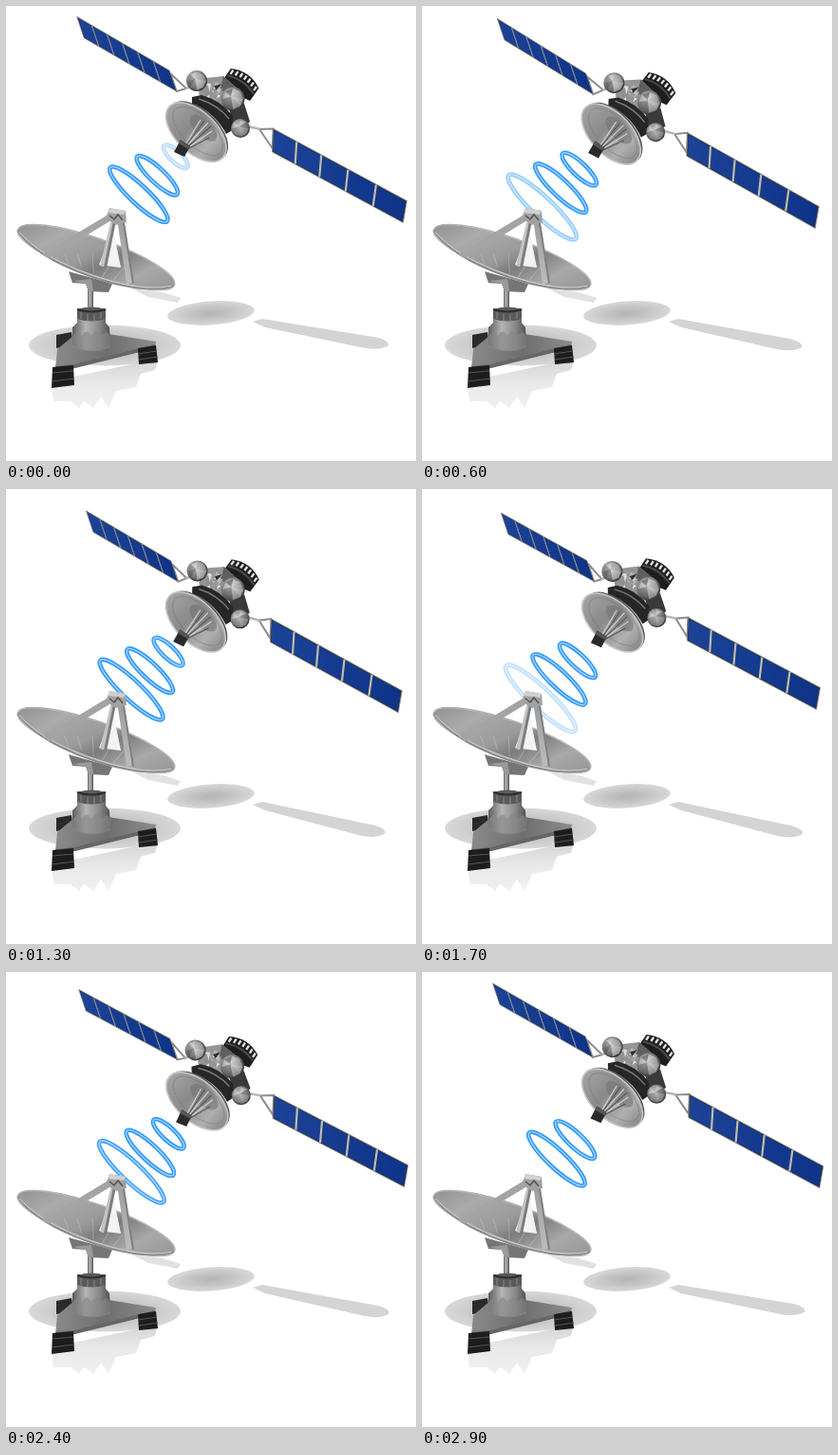
An HTML page that plays this animation: 432 by 480 pixels, repeating every 3000 ms.

```html
<!DOCTYPE html>
<html lang="en">
<head>
<meta charset="utf-8">
<title>Satellite link</title>
<style>
html, body { margin: 0; width: 100%; height: 100%; overflow: hidden; background: #fff; }
svg { display: block; width: 432px; height: 480px; }
</style>
</head>
<body>
<svg viewBox="0 0 432 480" xmlns="http://www.w3.org/2000/svg">
  <defs>
    <radialGradient id="ball" cx=".4" cy=".35" r=".7">
      <stop offset="0" stop-color="#d4d4d4"/><stop offset=".5" stop-color="#858585"/><stop offset="1" stop-color="#2c2c2c"/>
    </radialGradient>
    <linearGradient id="bowl" x1="0" x2="1" y1=".2" y2=".4">
      <stop offset="0" stop-color="#8e8e8e"/><stop offset=".25" stop-color="#ababab"/><stop offset=".5" stop-color="#9a9a9a"/>
      <stop offset=".62" stop-color="#7c7c7c"/><stop offset=".82" stop-color="#a8a8a8"/><stop offset="1" stop-color="#9a9a9a"/>
    </linearGradient>
    <linearGradient id="dish" x1="0" x2="1">
      <stop offset="0" stop-color="#a2a2a2"/><stop offset=".4" stop-color="#8a8a8a"/><stop offset=".75" stop-color="#b0b0b0"/><stop offset="1" stop-color="#8a8a8a"/>
    </linearGradient>
    <linearGradient id="metal">
      <stop offset="0" stop-color="#5e5e5e"/><stop offset=".35" stop-color="#b4b4b4"/><stop offset=".7" stop-color="#8a8a8a"/><stop offset="1" stop-color="#505050"/>
    </linearGradient>
    <linearGradient id="strut" x2="0" y2="1">
      <stop offset="0" stop-color="#9b9b9b"/><stop offset="1" stop-color="#bdbdbd"/>
    </linearGradient>
    <linearGradient id="plate">
      <stop offset="0" stop-color="#8a8a8a"/><stop offset=".5" stop-color="#6e6e6e"/><stop offset="1" stop-color="#8c8c8c"/>
    </linearGradient>
    <radialGradient id="shade">
      <stop offset="0" stop-color="#b4b4b4"/><stop offset=".6" stop-color="#c8c8c8"/><stop offset="1" stop-color="#d8d8d8"/>
    </radialGradient>
    <linearGradient id="mirror" x2="0" y2="1">
      <stop offset="0" stop-color="#d4d4d4"/><stop offset=".5" stop-color="#e9e9e9"/><stop offset="1" stop-color="#f0f0f0"/>
    </linearGradient>
    <linearGradient id="cells">
      <stop offset="0" stop-color="#1c4397"/><stop offset="1" stop-color="#0e3388"/>
    </linearGradient>
  </defs>

  <!-- ground shadows -->
  <path d="M48 396L160 372 157 384 142 388 137 402 116 406 108 424 100 412 92 424 82 417 77 424 68 417 50 417Z" fill="url(#mirror)"/>
  <ellipse cx="104" cy="358" rx="80" ry="21.5" fill="url(#shade)"/>
  <path d="M130 297L165 302 184 308 181 313 150 307Z" fill="#e2e2e2"/>
  <ellipse cx="216" cy="324" rx="46" ry="12.5" fill="url(#shade)" transform="rotate(-4 216 324)"/>
  <path id="wing" fill="#d4d4d4"/>

  <g id="rings" fill="none"></g>

  <!-- ground station -->
  <g>
    <path d="M53 347L69 344 71 358 53 361Z" fill="#2a2a2a"/>
    <path d="M54 362L72 347 108 346 158 354 157 361 73 381 52 382Z" fill="url(#plate)"/>
    <path d="M72 378L157 357 157 361 73 382 52 383 52 380Z" fill="#666"/>
    <path d="M49 381L71 379 72 400 48 403Z" fill="#1d1d1d"/>
    <path d="M49 387L71 385M48 396L72 393" stroke="#555"/>
    <path d="M139 361L158 358 160 376 140 378Z" fill="#1d1d1d"/>
    <path d="M139 367L159 364M140 373L160 370" stroke="#555"/>
    <path d="M86 298H92V322H86Z" fill="url(#metal)"/>
    <path d="M75 320Q90 315 105 320L105 334 109 339 110 358Q90 369 70 358L70 339 75 334Z" fill="url(#metal)"/>
    <path d="M75 320Q90 315 105 320V330Q90 335 75 330Z" fill="#5a5a5a"/>
    <path d="M75 320Q90 325 105 320" fill="none" stroke="#2e2e2e" stroke-width="2"/>
    <path d="M79 323V330M86 325V332M93 325V332M100 323V330" stroke="#888"/>
    <path d="M70 360V349Q75 340 80 348 85 339 90 348 96 339 101 348 106 340 110 349V360Q90 369 70 360Z" fill="#888" opacity=".65"/>
    <path d="M66 280L70 292 84 293 87 301 108 302 112 293Z" fill="#757575"/>
    <path d="M70 290L84 293 87 301 92 301 90 288Z" fill="#9a9a9a"/>
    <g transform="rotate(19.5 95 265)">
      <ellipse cx="95" cy="265" rx="87.5" ry="19.5" fill="url(#bowl)" stroke="#b4b4b4" stroke-width="1.6"/>
      <path d="M8 266Q35 286 95 286 155 286 182 266" fill="none" stroke="#8b8b8b" stroke-width="2"/>
      <path d="M10 267Q38 284 95 284 152 284 180 267" fill="none" stroke="#cfcfcf"/>
      <path d="M75 268L84 280M90 262L98 282M112 265L108 283M62 272L70 281M126 266L120 282" stroke="#c4c4c4" opacity=".5"/>
    </g>
    <path d="M113 236L121 276 98 273Z" fill="#f3f3f3"/>
    <path d="M106 221L111 226 45 266 38 262Z" fill="#a4a4a4"/>
    <path d="M111 225L116 226 106 276 99 274Z" fill="#c4c4c4"/>
    <path d="M113 227L116 226 106 276 103 276Z" fill="#7c7c7c"/>
    <path d="M117 224L124 223 135 292 127 293Z" fill="url(#strut)"/>
    <path d="M122 223L124 223 135 292 133 293Z" fill="#808080"/>
    <path d="M109 213L126 216 127 228 116 231 105 224Z" fill="#a2a2a2"/>
    <path d="M109 213L126 216 124 220 107 218Z" fill="#d0d0d0"/>
    <path d="M109 221L114 225 118 220 123 226" fill="none" stroke="#555" stroke-width="1.5"/>
  </g>

  <!-- satellite -->
  <g id="panels"></g>
  <g id="body">
    <path d="M189 87L198 84M250 126L268 130" stroke="#b5b5b5" stroke-width="2.5"/>
    <g transform="translate(247 83) rotate(35)">
      <path d="M-18 -8Q0 -18 18 -8V8Q0 13 -18 8Z" fill="#1e1e1e"/>
      <path d="M-17 0Q0 -7 17 0" fill="none" stroke="#4a4a4a" stroke-width="2"/>
      <path id="slots" stroke="#e2e2e2" stroke-width="2.4"/>
    </g>
    <path d="M234 106L251 103 257 122 243 134Z" fill="#3a3a3a"/>
    <path d="M203 91L210 76 229 74 245 88 240 109 222 114 205 102Z" fill="#949494"/>
    <path d="M229 74L245 88 241 98 226 88Z" fill="#5f5f5f"/>
    <g id="foil"></g>
    <path d="M196 96L206 94Q226 99 239 116L240 130 232 135Q220 112 196 103Z" fill="#262626"/>
    <path d="M203 98Q223 104 235 119" fill="none" stroke="#777" stroke-width="1.5"/>
    <g id="balls"></g>
    <g transform="rotate(44 201 133)">
      <ellipse cx="201" cy="131" rx="39" ry="21.5" fill="#5a5a5a"/>
      <ellipse cx="200.5" cy="133.5" rx="39" ry="21.5" fill="url(#dish)" stroke="#c6c6c6" stroke-width="1.6"/>
      <ellipse cx="201" cy="131.5" rx="33" ry="16" fill="none" stroke="#777" opacity=".5"/>
      <ellipse cx="203" cy="125" rx="18" ry="9" fill="#767676" opacity=".6"/>
    </g>
    <path d="M189 146L205 120M190 148L213 123M191 150L217 132" stroke="#d0d0d0" stroke-width="1.2"/>
    <path d="M190 147L209 121M191 149L216 127M191 151L214 139" stroke="#5a5a5a" stroke-width="1.2"/>
    <path d="M184 141L194 148 188 159 177 154Z" fill="#2a2a2a"/>
    <path d="M184 141L194 148 192 151 182 145Z" fill="#555"/>
  </g>
</svg>
<script>
const NS = 'http://www.w3.org/2000/svg';
const $ = id => document.getElementById(id);
const LOOP = 3000, STEP = 100;

function add(parent, tag, attrs) {
  const el = document.createElementNS(NS, tag);
  set(el, attrs);
  parent.appendChild(el);
  return el;
}
function set(el, attrs) {
  for (const k in attrs) el.setAttribute(k, attrs[k]);
}

let seed = 7;
const rnd = () => (seed = (seed * 16807) % 2147483647) / 2147483647;
const grey = (lo, hi) => {
  const v = Math.round(lo + rnd() * (hi - lo));
  return `rgb(${v},${v},${v})`;
};

function facetBall(x, y, r) {
  const g = $('balls');
  add(g, 'circle', { cx: x, cy: y, r, fill: 'url(#ball)' });
  for (let i = 0; i < 8; i++) {
    const a = i * Math.PI / 4, b = a + Math.PI / 4, q = r * .88;
    const cx = x - r * .15, cy = y - r * .2;
    add(g, 'path', {
      d: `M${cx} ${cy}L${x + q * Math.cos(a)} ${y + q * Math.sin(a)} ${x + q * Math.cos(b)} ${y + q * Math.sin(b)}Z`,
      fill: grey(60, 240), opacity: .5
    });
  }
}

// crumpled foil on the hull
for (let i = 0; i < 28; i++) {
  const x = 208 + rnd() * 22, y = 80 + rnd() * 20;
  const p = () => `${x + rnd() * 10 - 5} ${y + rnd() * 10 - 5}`;
  add($('foil'), 'path', { d: `M${p()}L${p()} ${p()}Z`, fill: rnd() < .2 ? '#2c2c2c' : grey(130, 250) });
}
facetBall(201, 79, 11);
facetBall(239, 98, 12.5);
facetBall(247, 129, 10);

let slots = '';
for (let x = -15; x <= 15; x += 5) slots += `M${x} ${-11.5 + x * x / 65}v5`;
$('slots').setAttribute('d', slots);

const bracket = add($('panels'), 'path', { fill: 'none', stroke: '#8d8d8d', 'stroke-width': 2 });
function makePanel(cuts, gap, line) {
  const frame = add($('panels'), 'path', { fill: '#2c3038', stroke: '#85888c', 'stroke-width': .8 });
  const cells = add($('panels'), 'path', { fill: 'url(#cells)' });
  const bars = add($('panels'), 'path', { stroke: line, 'stroke-width': gap });
  return { frame, cells, bars, cuts };
}
const left = makePanel([0, .16, .325, .49, .655, .825, 1], 1, '#7f8a98');
const right = makePanel([0, .175, .36, .56, .77, 1], 2.2, '#bdbdb2');

const mix = (p, q, k) => [p[0] + (q[0] - p[0]) * k, p[1] + (q[1] - p[1]) * k];
const poly = pts => 'M' + pts.map(p => p[0].toFixed(2) + ' ' + p[1].toFixed(2)).join('L') + 'Z';
const shift = (p, x, y) => [p[0] + x, p[1] + y];

// corners: a-b is the upper edge, d-c the lower edge
function drawPanel(panel, a, b, c, d) {
  const at = (u, v) => mix(mix(a, b, u), mix(d, c, u), v);
  let cells = '', bars = '';
  panel.cuts.forEach((u, i, all) => {
    if (i) {
      const s = all[i - 1] + .008, e = u - .008;
      cells += poly([at(s, .05), at(e, .05), at(e, .95), at(s, .95)]);
    }
    if (i && i < all.length - 1) bars += poly([at(u, .02), at(u, .98)]);
  });
  set(panel.frame, { d: poly([a, b, c, d]) });
  set(panel.cells, { d: cells });
  set(panel.bars, { d: bars });
}

const rings = [0, 1, 2].map(() => {
  const g = add($('rings'), 'g', {});
  return {
    g,
    parts: [['#2f98fb', 4.6], ['#9ccfff', 1.5]].map(([stroke, w]) =>
      add(g, 'ellipse', { stroke, 'stroke-width': w }))
  };
});

function draw(ms) {
  const th = ms / LOOP * 2 * Math.PI;
  const cos = deg => Math.cos(th + deg * Math.PI / 180);
  const wave = (mid, amp, deg) => mid - amp * cos(deg);

  // hull bobs and rocks
  const dy = wave(4, 4, 0), rock = 2.7 * Math.sin(th);
  set($('body'), { transform: `translate(0 ${dy}) rotate(${rock} 215 110)` });
  const onBody = (x, y) => {
    const r = rock * Math.PI / 180, X = x - 215, Y = y - 110;
    return [215 + X * Math.cos(r) - Y * Math.sin(r), 110 + dy + X * Math.sin(r) + Y * Math.cos(r)];
  };

  const lo = [wave(79.5, 5, 16), wave(18, 7.3, -22)];
  const li = [wave(180.5, .8, 0), wave(94, 4, 6)];
  const ri = [wave(280.7, -1.5, 54), wave(133, 4.1, 30)];
  const ro = [wave(420.3, -3.5, 54), wave(208.5, 5, 54)];
  const liTop = shift(li, -7.5, -22), riLow = shift(ri, -1, 24.5);
  drawPanel(left, lo, liTop, li, shift(lo, 7.5, 22.5));
  drawPanel(right, ri, ro, shift(ro, -4, 23), riLow);
  set(bracket, {
    d: poly([mix(liTop, li, .15), onBody(190, 87), li]) + poly([ri, onBody(267, 130), mix(ri, riLow, .85)])
  });

  const sx = wave(0, -2.2, 54), sy = wave(2.5, 2.8, -10);
  set($('wing'), {
    d: `M260 333L270 330 ${390 + sx} ${350 + sy}Q${404 + sx} ${354 + sy} ${401 + sx} ${359 + sy} ${392 + sx} ${364 + sy} ${376 + sx} ${361 + sy}L273 339Z`
  });

  // rings grow while they travel down to the ground dish
  const phase = ms % 1000 / 1000;
  const ox = wave(.5, -1.2, 48), oy = wave(4.2, 4.2, -20);
  rings.forEach((ring, i) => {
    const u = phase + i;
    const x = 177.5 - 19.5 * u + ox, y = 158.5 + 20 * u + oy;
    const fade = Math.min(1, .35 + 2 * u, Math.max(0, (2.85 - u) / .5));
    set(ring.g, { transform: `translate(${x} ${y}) rotate(43.5)`, opacity: fade });
    ring.parts.forEach(p => set(p, { rx: 16.7 + 12.3 * u, ry: 6 + 1.8 * u }));
  });
}

const start = performance.now();
function tick() {
  const ms = (performance.now() - start) % LOOP;
  draw(Math.floor(ms / STEP) * STEP);
  requestAnimationFrame(tick);
}
tick();
</script>
</body>
</html>
```
